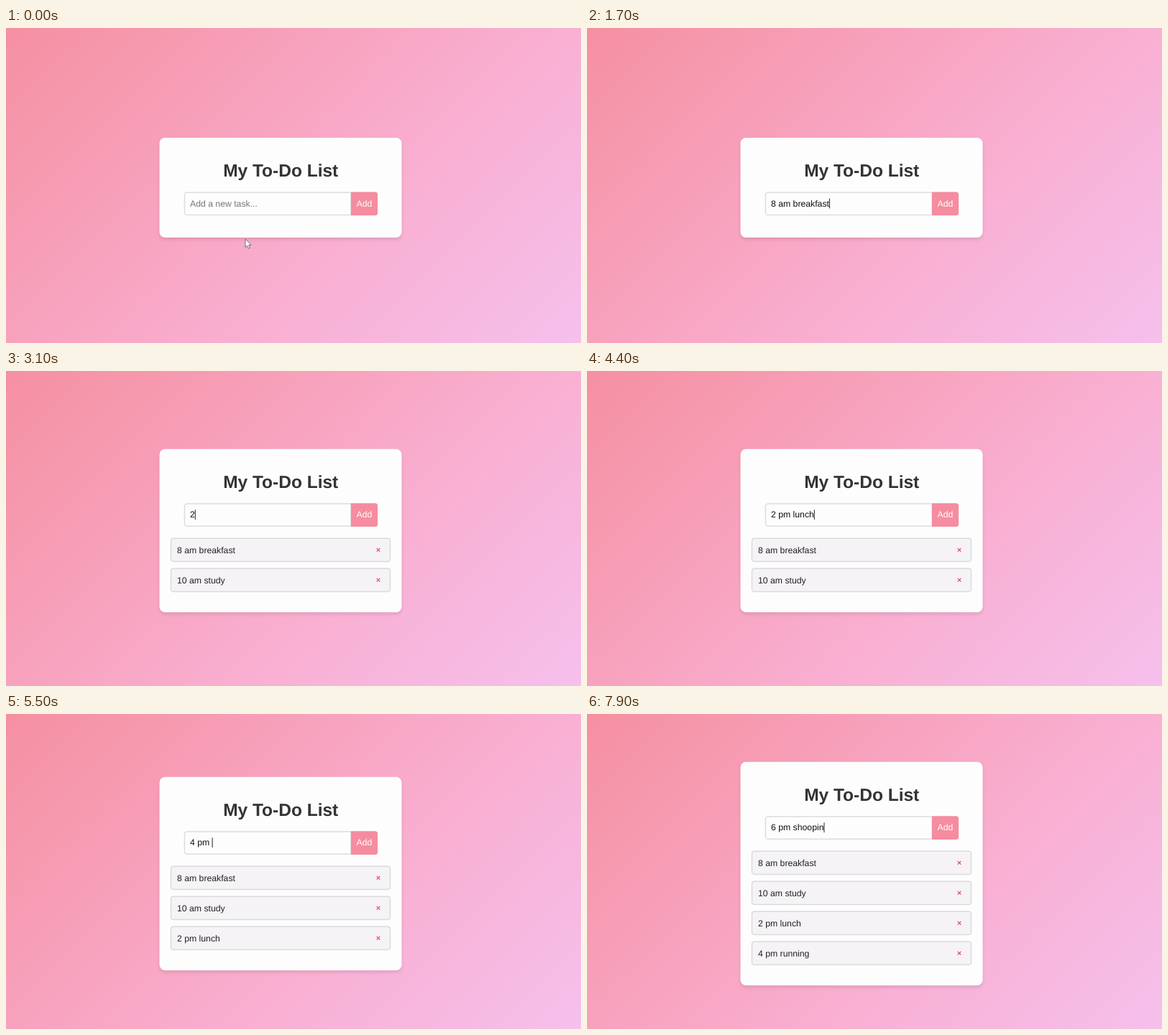
These frames come from a looping animation (800 px wide and 439 px high, 8000 ms). An HTML page:

```html
<!DOCTYPE html>
<html lang="en">
<head>
<meta charset="utf-8">
<title>My To-Do List</title>
<style>
  html, body { margin: 0; width: 100%; height: 100%; overflow: hidden; }
  body { background: linear-gradient(135deg, #f590a1, #f9aed0 60%, #f5c0ec); }
  svg { display: block; width: 800px; height: 439px; }
  text {
    font: 12.24px "Liberation Sans", Arial, sans-serif;
    text-rendering: geometricPrecision;
    white-space: pre;
  }
  #card { fill: #fefdfe; filter: drop-shadow(0 3px 2.3px rgba(0, 0, 0, .1)); }
  #title { font-size: 24.5px; font-weight: bold; fill: #333; text-anchor: middle; }
  .field { fill: #fefdfe; stroke: #ddd; stroke-width: 1.5; }
  .button { fill: #f58c9f; }
  .label { fill: #fff; text-anchor: middle; }
  .item rect { fill: #f5f3f6; stroke: #dbd9dc; stroke-width: 1.5; }
  .item text { fill: #222; }
  .item .del { fill: #e04c72; font-size: 11px; font-weight: bold; text-anchor: middle; }
  #caret { fill: #222; }
</style>
</head>
<body>
<svg viewBox="0 0 800 439">
  <rect id="card" x="213.5" width="337" rx="7.7"/>
  <g id="panel">
    <text id="title" x="382.2" y="54.4">My To-Do List</text>
    <path class="field" d="M480 76.2H252a3.6 3.6 0 0 0 -3.6 3.6v24.2a3.6 3.6 0 0 0 3.6 3.6H480z"/>
    <path class="button" d="M480 75.5H513.5a3.6 3.6 0 0 1 3.6 3.6v25.6a3.6 3.6 0 0 1 -3.6 3.6H480z"/>
    <text class="label" x="498.5" y="95.7">Add</text>
    <text id="entry" x="256" y="95.7" xml:space="preserve"></text>
    <rect id="caret" x="256" y="84.6" width="1" height="13.8"/>
    <g id="list"></g>
  </g>
  <path id="mouse" d="M333 294v11.6l2.6-2.4 1.9 4.2 1.9-.8-1.8-4.1h3.5z"
        fill="#fff" stroke="#666" stroke-width=".9" stroke-linejoin="round"/>
</svg>
<script>
const LOOP = 8000, STEP = 100;
const $ = id => document.getElementById(id);

// The hour and the activity are each typed at an even pace between two times.
const tasks = [
  { hour: "8 am ", name: "breakfast", hourAt: [100, 800], nameAt: [900, 1700], add: 1800 },
  { hour: "10 am ", name: "study", hourAt: [1900, 2500], nameAt: [2600, 2800], add: 2900 },
  { hour: "2 pm ", name: "lunch", hourAt: [3100, 3900], nameAt: [4200, 4400], add: 4500 },
  { hour: "4 pm ", name: "running", hourAt: [4700, 5500], nameAt: [5600, 6000], add: 6200 },
  { hour: "6 pm ", name: "shoopin", hourAt: [6800, 7300], nameAt: [7400, 7900], add: LOOP }
];

function typed(text, [from, to], t) {
  if (t < from) return "";
  const part = Math.min(1, (t - from) / (to - from));
  return text.slice(0, 1 + Math.floor(part * (text.length - 1)));
}

$("list").innerHTML = tasks.slice(0, -1).map(({ hour, name }, i) => `
  <g class="item" transform="translate(0 ${42 * i})">
    <rect x="229.5" y="124.4" width="305" height="32.4" rx="3.4"/>
    <text x="238" y="145">${hour + name}</text>
    <text class="del" x="518" y="144">×</text>
  </g>`).join("");
const items = [...$("list").children];

function draw(t) {
  const count = tasks.filter(task => t >= task.add).length;
  const { hour, name, hourAt, nameAt } = tasks[count];
  const text = typed(hour, hourAt, t) + typed(name, nameAt, t);
  const idle = t < tasks[0].hourAt[0];

  const height = count ? 143.5 + 42 * count : 139;
  const top = 222.5 - height / 2;
  $("card").setAttribute("y", top);
  $("card").setAttribute("height", height);
  $("panel").setAttribute("transform", `translate(0 ${top})`);
  items.forEach((item, i) => item.style.display = i < count ? "" : "none");

  const entry = $("entry");
  entry.textContent = text || "Add a new task...";
  entry.style.fill = text ? "#111" : "#757575";
  $("caret").setAttribute("x", 256 + (text ? entry.getComputedTextLength() : 0));
  $("caret").style.display = idle ? "none" : "";
  $("mouse").style.display = idle ? "" : "none";
}

const start = performance.now();
let last = -1;
function tick() {
  const t = (performance.now() - start) % LOOP;
  const now = t - t % STEP;
  if (now !== last) draw(last = now);
  requestAnimationFrame(tick);
}
tick();
</script>
</body>
</html>
```
